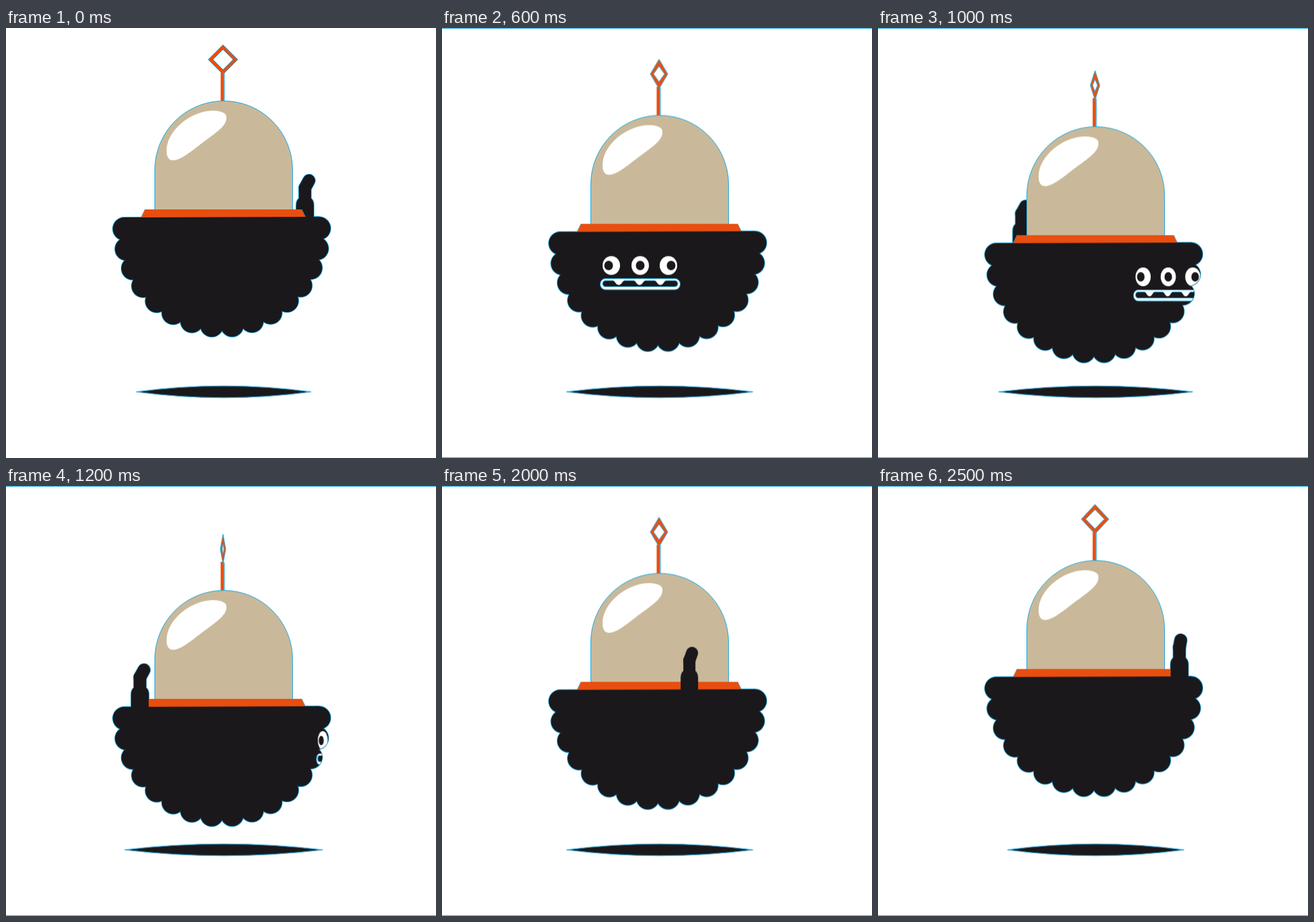
Write an HTML page without scripts that moves like this. It is 640 px wide and 640 px high and loops after 2.6 s.

```html
<!DOCTYPE html>
<html lang="en">
<head>
<meta charset="utf-8">
<title>Hovering robot</title>
<style>
  html, body { margin: 0; height: 100%; overflow: hidden; background: #fff; }
  svg { display: block; width: 100%; height: 100%; }

  svg { --ink: #1a181b; --rim: #1ba8e0; --orange: #e84e10; --grow: 0px; color: var(--ink); }
  .rim { color: var(--rim); --grow: 1.8px; }
  .orange { fill: var(--orange); }
  .line { stroke: var(--rim); stroke-width: 1; vector-effect: non-scaling-stroke; }
  .solid { fill: currentColor; stroke: currentColor; stroke-width: var(--grow); }
  .scallop { fill: currentColor; stroke: currentColor; stroke-width: calc(34px + var(--grow));
    stroke-linecap: round; stroke-dasharray: 0 1; }
  .tube { fill: none; stroke: currentColor; stroke-width: calc(18px + var(--grow));
    stroke-linecap: round; vector-effect: non-scaling-stroke; }

  /* Everything advances in 100 ms ticks: 26 per loop */
  .bob, .spin, .hole, .face, .orbit, .hook, .shade, .front, .edges {
    animation: 2600ms steps(13) -2ms infinite; }
  .bob { animation-name: bob; }
  .spin { animation-name: spin; }
  .hole { animation-name: hole; }
  .face { animation-name: face; }
  .hook { animation-name: hook; }
  .shade { animation-name: shade; }
  .orbit { animation-name: orbit; animation-timing-function: steps(26); }
  .front { animation-name: front; animation-timing-function: step-end; }
  .edges { animation-name: edges; animation-timing-function: step-end; }

  @keyframes bob {
    0% { transform: translateY(0); animation-timing-function: steps(2); }
    7.692% { transform: translateY(4.7px); animation-timing-function: steps(2); }
    15.384% { transform: translateY(13px); animation-timing-function: steps(9); }
    50% { transform: translateY(51px); animation-timing-function: steps(9); }
    84.615% { transform: translateY(13px); animation-timing-function: steps(2); }
    92.307% { transform: translateY(4.7px); animation-timing-function: steps(2); }
    100% { transform: translateY(0); }
  }
  @keyframes spin { 50% { transform: scaleX(.114); } }
  @keyframes hole { 50% { transform: scale(.02, .5); } }
  @keyframes shade { 50% { transform: scaleX(1.145); } }
  @keyframes face {
    0% { transform: translateX(88px) scaleX(.6); animation-timing-function: steps(4); }
    15.384% { transform: translateX(227px) scaleX(.92); animation-timing-function: steps(2); }
    23.076% { transform: translateX(295px) scaleX(1); animation-timing-function: steps(2); }
    30.769% { transform: translateX(363.5px) scaleX(1); animation-timing-function: steps(2); }
    38.461% { transform: translateX(432px) scaleX(.87); animation-timing-function: steps(2); }
    46.153% { transform: translateX(496px) scaleX(.57); animation-timing-function: steps(1); }
    50%, 100% { transform: translateX(530px) scaleX(.45); }
  }
  /* Two opposed half-radius turns: a pure horizontal cosine */
  @keyframes orbit {
    from { transform: rotate(13.846deg) translateX(62.3px) rotate(-27.692deg) translateX(62.3px) rotate(13.846deg); }
    to { transform: rotate(373.846deg) translateX(62.3px) rotate(-747.692deg) translateX(62.3px) rotate(373.846deg); }
  }
  @keyframes hook {
    0%, 15.384% { transform: scaleX(1); animation-timing-function: steps(6); }
    38.461%, 46.153% { transform: scaleX(-1); animation-timing-function: steps(4); }
    61.538% { transform: scaleX(-.85); animation-timing-function: steps(4); }
    76.923% { transform: scaleX(.55); animation-timing-function: steps(5); }
    96.153%, 100% { transform: scaleX(1); }
  }
  @keyframes front { 0% { visibility: hidden; } 46.153%, 100% { visibility: visible; } }
  @keyframes edges { 0% { visibility: hidden; } 3.846%, 100% { visibility: visible; } }
</style>
</head>
<body>
<svg viewBox="0 0 640 640">
  <defs>
    <g id="bowl">
      <path class="scallop" pathLength="15.005" d="M176 299A145 145 0 0 0 466 298"/>
      <path class="solid" d="M176 282L466 281V300H176Z"/>
    </g>
    <g id="scope">
      <path class="solid" d="M-13 283V264Q-13 256 -8 253H8Q13 256 13 264V283Z"/>
      <path class="tube" d="M0 258V238"/>
      <path class="tube hook" d="M0 238L6 227"/>
    </g>
    <g id="eye">
      <ellipse cy="332" rx="13" ry="14" fill="#fff"/>
    </g>
    <path id="tooth" d="M-11 353H11Q7 354 4 359Q0 363 -4 359Q-7 354 -11 353Z" fill="#fff"/>
    <mask id="inside" maskUnits="userSpaceOnUse" x="0" y="0" width="640" height="640">
      <use href="#bowl" color="#fff"/>
    </mask>
  </defs>

  <g class="edges">
    <rect width="640" height="1" fill="#1ba8e0"/>
    <rect y="639" width="640" height="1" fill="#888"/>
  </g>

  <g transform="translate(324 541.5)">
    <path class="shade line" d="M-130 0Q0 -17.5 130 0Q0 17.5 -130 0Z" fill="#1a181b"/>
  </g>

  <g class="bob">
    <use class="rim" href="#bowl"/>

    <rect class="orange" x="319.5" y="66" width="5" height="43"/>
    <rect x="324.5" y="67" width="1" height="42" fill="#1ba8e0"/>
    <g transform="translate(323 47)">
      <path class="orange spin line" d="M0 -22L22 0L0 22L-22 0Z"/>
      <path class="hole line" d="M0 -15L15 0L0 15L-15 0Z" fill="#fff"/>
    </g>

    <g transform="translate(324)">
      <g class="orbit">
        <use class="rim" href="#scope"/>
        <use href="#scope"/>
      </g>
    </g>

    <path class="line" d="M221.500 271V211A102.500 102.500 0 0 1 426.500 211V271" fill="#c9b99a"/>
    <path d="M328 133C329 126 318 123 307 123C275 124 239 152 239 183C239 193 243 197 249 197C262 197 283 177 303 163C318 152 329 143 328 133Z" fill="#fff"/>
    <path class="line" d="M201 282L207 270M440 270L446 282"/>
    <path class="orange" d="M207 270H440L446 283H201Z"/>
    <use href="#bowl"/>

    <g mask="url(#inside)">
      <g class="face">
        <use href="#eye" x="-43"/>
        <use href="#eye"/>
        <use href="#eye" x="42"/>
        <g fill="#1a181b">
          <ellipse cx="-47" cy="332" rx="6.500" ry="7"/>
          <ellipse cy="332" rx="6.500" ry="7"/>
          <ellipse cx="46" cy="332" rx="6.500" ry="7"/>
        </g>
        <rect class="line" x="-59.500" y="351.500" width="119" height="16.500" rx="8" fill="#fff"/>
        <rect class="line" x="-56" y="354.500" width="112" height="9" rx="4.500" fill="#1a181b"/>
        <use href="#tooth" x="-32"/>
        <use href="#tooth" x="-1"/>
        <use href="#tooth" x="30"/>
      </g>
    </g>

    <g class="front">
      <g transform="translate(324)">
        <use class="orbit" href="#scope"/>
      </g>
    </g>
  </g>
</svg>
</body>
</html>
```
